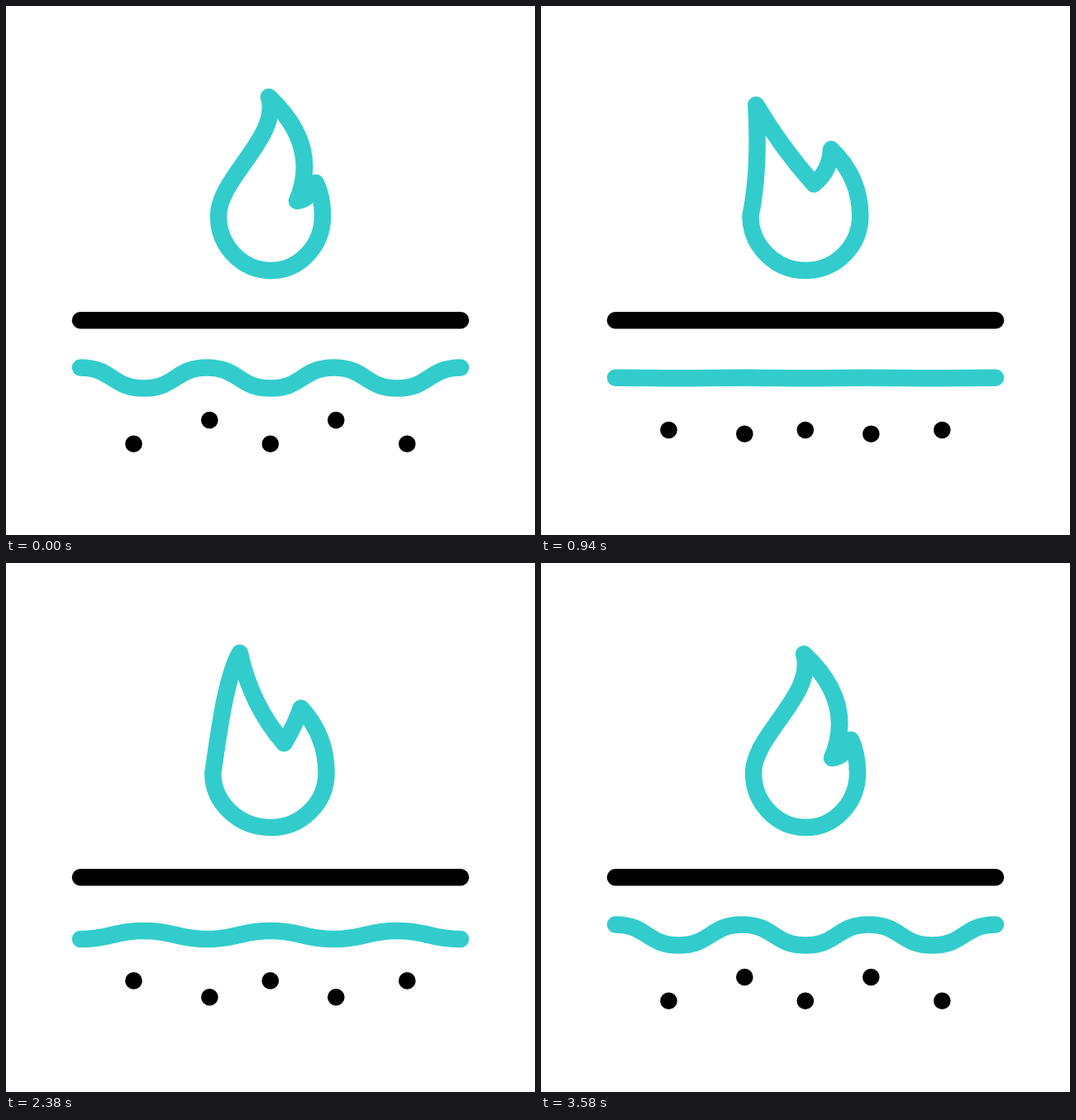
Write an HTML page that moves like this. It is 640 by 640 pixels and loops after 3.6 s.

```html
<!DOCTYPE html>
<html lang="en">
<head>
<meta charset="utf-8">
<title>Flame over waves</title>
<style>
  html, body { margin: 0; width: 100%; height: 100%; overflow: hidden; background: #fff; }
  svg { display: block; width: 100vw; height: 100vh; }
  path { fill: none; stroke: #3cc; stroke-width: 20.5; stroke-linecap: round; stroke-linejoin: round; }
  #ground { stroke: #000; }
</style>
</head>
<body>
<svg viewBox="0 0 640 640">
  <path id="flame"/>
  <path id="spark"/>
  <path id="ground" d="M90 380.2H550"/>
  <path id="wave"/>
  <g id="dots"></g>
</svg>
<script>
const LOOP = 3600, HALF = 1790;
const el = id => document.getElementById(id);
const mix = (a, b, k) => a + (b - a) * k;
const mixPoint = (a, b, k) => a.map((n, i) => mix(n, b[i], k));

// Key points of the flame; sides holds the left x, right x and left lean
const rest = { at: 0, tip: [318, 110], curl: [333, 158], sides: [257, 383, 0],
  side: [375, 214], bend: [368, 234], notch: [352, 236], sweep: [381, 169] };
const poses = [
  rest,
  { at: 340, tip: [299, 101], curl: [268, 124], sides: [248, 388.5, 5],
    side: [361, 177], bend: [350, 193], notch: [341, 220], sweep: [301, 173] },
  { at: 1000, tip: [256.5, 121.5], curl: [262, 162], sides: [254, 386, 10],
    side: [350, 173], bend: [350, 200], notch: [329, 215], sweep: [289, 170] },
  { at: 1360, tip: [271.5, 123], curl: [298, 164], sides: [257, 388, 1],
    side: [358, 188], bend: [358, 217], notch: [340, 224], sweep: [314, 149] },
  { ...rest, at: HALF }
];

const dots = [154.5, 246.3, 319.8, 399.3, 485.3].map(x => {
  const c = document.createElementNS("http://www.w3.org/2000/svg", "circle");
  c.setAttribute("cx", x);
  c.setAttribute("r", 10.3);
  return el("dots").appendChild(c);
});

// cubic-bezier(.5, 0, .5, 1)
function ease(x) {
  let lo = 0, hi = 1;
  for (let i = 0; i < 24; i++) {
    const u = (lo + hi) / 2;
    if (1.5 * u * (1 - u) + u ** 3 < x) lo = u; else hi = u;
  }
  return lo * lo * (3 - 2 * lo);
}

function flamePath(u) {
  const i = poses.findIndex(p => p.at > u), a = poses[i - 1], b = poses[i];
  const k = (u - a.at) / (b.at - a.at);
  const at = name => mixPoint(a[name], b[name], k);
  const tip = at("tip"), side = at("side"), [left, right, lean] = at("sides");
  const mid = 320.5, base = 320, belly = 254, round = .55;
  const low = mix(belly, base, round);
  return `M${tip}C${at("curl")} ${left + lean} 208 ${left} ${belly}` +
    `C${left} ${low} ${mix(mid, left, round)} ${base} ${mid} ${base}` +
    `C${mix(mid, right, round)} ${base} ${right} ${low} ${right} ${belly}` +
    `Q${right} ${mix(side[1], belly, .42)} ${side}` +
    `Q${at("bend")} ${at("notch")}Q${at("sweep")} ${tip}Z`;
}

// Short streak thrown off the side tip
function sparkPath(u) {
  const k = 1 - Math.abs(u - 150) / 70;
  return k > 0 ? `M371.5 182.5l${12.5 * k} ${-20.5 * k}` : "";
}

function wavePath(amp) {
  const step = 460 / 6;
  let d = `M90 ${450 + amp}`;
  for (let i = 1; i <= 6; i++) {
    const x = 90 + step * i, y = amp * (i % 2 ? -1 : 1);
    d += `C${x - step / 2} ${450 - y} ${x - step / 2} ${450 + y} ${x} ${450 + y}`;
  }
  return d;
}

function draw(time) {
  const t = Math.min(time, 2 * HALF), u = t % HALF;
  const p = ease(1 - Math.abs(t / HALF - 1));
  el("flame").setAttribute("d", flamePath(u));
  el("spark").setAttribute("d", sparkPath(u));
  el("wave").setAttribute("d", wavePath(mix(-12.5, 9.5, p)));
  dots.forEach((c, i) => c.setAttribute("cy", i % 2 ? mix(501, 531.3, p) : mix(529.7, 499.3, p)));
}

const start = performance.now();
function tick() {
  draw((performance.now() - start) % LOOP);
  requestAnimationFrame(tick);
}
draw(0);
requestAnimationFrame(tick);
</script>
</body>
</html>
```
